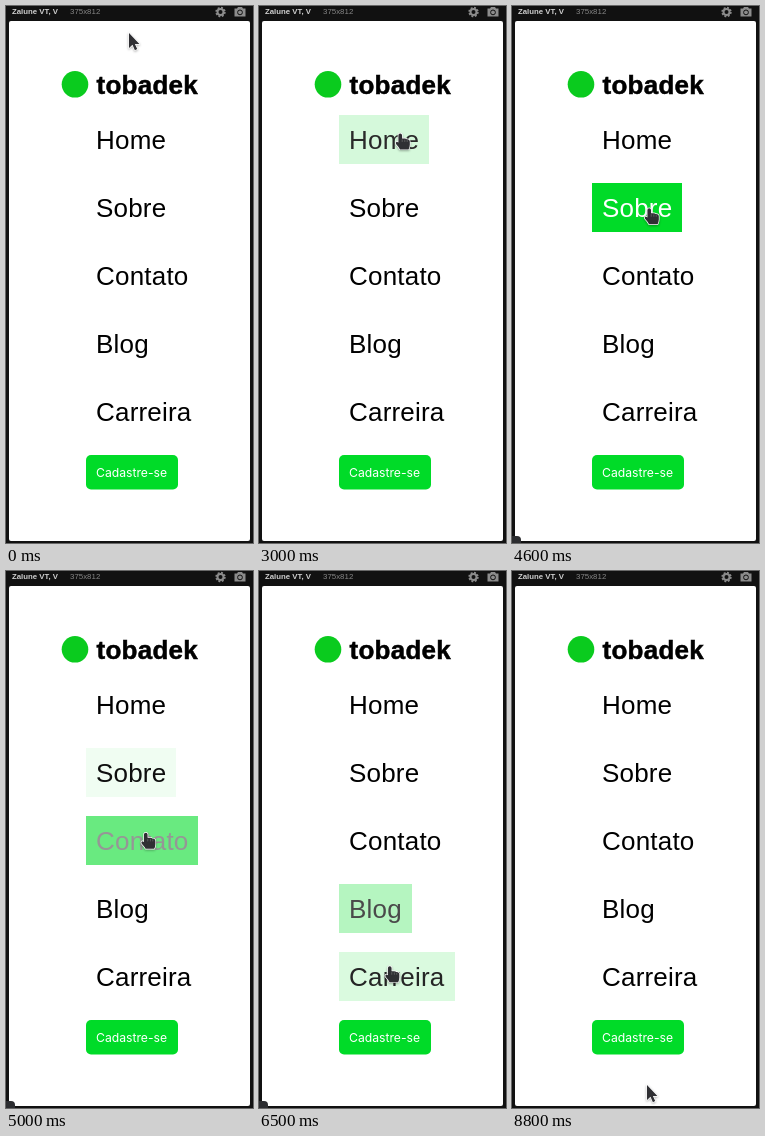
An HTML page for the animation above (9800 ms loop, 247 by 537 pixels).

```html
<!DOCTYPE html>
<html lang="pt">
<head>
<meta charset="utf-8">
<title>Menu</title>
<style>
  html, body { margin: 0; width: 100%; height: 100%; overflow: hidden; background: #111; }
  svg { display: block; width: 247px; height: 537px; }
  text { font-family: "Liberation Sans", Arial, sans-serif; white-space: pre; }
  .link { font-size: 26px; letter-spacing: .2px; }
  .brand { font-size: 26px; font-weight: bold; letter-spacing: .25px; stroke: #000; stroke-width: .5px; }
  .action { font: 12.2px Inter, sans-serif; fill: #fff; }
  .cursor { fill: #2f2f33; stroke: #fff; stroke-width: 1.4px; stroke-linejoin: round; paint-order: stroke;
            filter: drop-shadow(0 1px 1px rgba(0, 0, 0, .3)); }
</style>
</head>
<body>
<svg viewBox="0 0 247 537">
  <rect width="247" height="537" fill="#111"/>
  <text x="6" y="8" font-size="7.8" font-weight="bold" fill="#d0d0d0">Zalune VT, V</text>
  <text x="64" y="8" font-size="7.9" fill="#858585">375x812</text>
  <g fill="none" stroke="#8c8c8c">
    <circle cx="214.5" cy="6" r="3" stroke-width="2"/>
    <circle cx="214.5" cy="6" r="4.4" stroke-width="1.6" stroke-dasharray="1.9 1.556"/>
  </g>
  <path d="M228.5 2.5H231L232 1H236L237 2.5H239.5V10.5H228.5Z" fill="#8c8c8c"/>
  <circle cx="234" cy="6.4" r="2.4" fill="#8c8c8c" stroke="#111"/>
  <rect x="3" y="15" width="241" height="520" rx="2" fill="#fff"/>
  <circle cx="69" cy="78.3" r="13.3" fill="#0acb1e"/>
  <text class="brand" x="90.5" y="88">tobadek</text>
  <g id="menu"></g>
  <rect x="80" y="449" width="92" height="34.5" rx="5" fill="#00db28"/>
  <text class="action" x="90" y="471">Cadastre-se</text>
  <path id="status" d="M0 530H5Q9 530 9 534V537H0Z" fill="#2c2d30"/>
  <g id="pointer">
    <path id="arrow" class="cursor" d="M0 0V15L3.5 11.8L5.9 17.2L8.2 16.1L5.9 11H10.4Z"/>
    <g id="hand">
      <path class="cursor" d="M-1.8 1.8A1.8 1.8 0 0 1 1.8 1.8V5H4.4Q6 5 6.4 5.8Q9.6 5.6 9.6 8.4V11.4Q9.6 13.6 8.4 16H-.2Q-1 14 -4.2 10.6Q-5 8.8 -3.4 8.4L-1.8 9.2Z"/>
      <path d="M2 6V8.6M4.6 6.2V8.6M7 6.6V8.6" fill="none" stroke="#777" stroke-width=".6"/>
    </g>
  </g>
</svg>
<script>
const LOOP = 9800, STEP = 100, FADE = 300, ROW = 68;
const $ = id => document.getElementById(id);

// hover interval of each link
const links = [
  { label: 'Home', enter: 2958, leave: 3711 },
  { label: 'Sobre', enter: 3893, leave: 4790 },
  { label: 'Contato', enter: 4898, leave: 5600 },
  { label: 'Blog', enter: 5700, leave: 6374 },
  { label: 'Carreira', enter: 6461, leave: 7085 }
];

// each move eases the pointer to a new resting place
const home = [123, 27];
const moves = [
  { from: 600, to: 1300, at: [14, 61] },
  { from: 1300, to: 1600, at: [21, 68] },
  { from: 1600, to: 2400, at: [143, 79] },
  { from: 2600, to: 3100, at: [141, 133] },
  { from: 3500, to: 4100, at: [137, 197] },
  { from: 4500, to: 5100, at: [140, 267] },
  { from: 5300, to: 6000, at: [135, 334] },
  { from: 6100, to: 6630, at: [130, 406] },
  { from: 6800, to: 7400, at: [135, 464] },
  { from: 7900, to: 8000, at: [136, 464] },
  { from: 8100, to: 8800, at: [135, 514] }
];

function add(tag, attrs) {
  const el = document.createElementNS('http://www.w3.org/2000/svg', tag);
  for (const k in attrs) el.setAttribute(k, attrs[k]);
  return $('menu').appendChild(el);
}

links.forEach((link, i) => {
  link.box = add('rect', { x: 80, y: 109 + ROW * i, height: 49, fill: '#00db28' });
  link.text = add('text', { class: 'link', x: 90, y: 143 + ROW * i });
  link.text.textContent = link.label;
  link.box.setAttribute('width', Math.round(link.text.getComputedTextLength() + 20));
});

const clamp = v => Math.min(1, Math.max(0, v));
const smooth = k => k * k * (3 - 2 * k);

// CSS "ease": cubic-bezier(.25, .1, .25, 1)
function ease(x) {
  if (x <= 0 || x >= 1) return clamp(x);
  let lo = 0, hi = 1, u;
  for (let i = 0; i < 20; i++) {
    u = (lo + hi) / 2;
    if (.75 * u * (1 - u) + u ** 3 < x) lo = u; else hi = u;
  }
  return .3 * u * (1 - u) ** 2 + 3 * u * u * (1 - u) + u ** 3;
}

function position(t) {
  return moves.reduce(([x, y], { from, to, at }) => {
    const k = smooth(clamp((t - from) / (to - from)));
    return [x + (at[0] - x) * k, y + (at[1] - y) * k];
  }, home);
}

function draw(t) {
  for (const { box, text, enter, leave } of links) {
    const k = ease((t - enter) / FADE) - ease((t - leave) / FADE);
    const grey = Math.round(255 * k);
    box.setAttribute('opacity', k);
    text.setAttribute('fill', `rgb(${grey},${grey},${grey})`);
  }
  const [x, y] = position(t);
  const onButton = y > 449 && y < 483;
  const over = onButton || links.some(({ enter, leave }) => t >= enter && t < leave);
  $('pointer').setAttribute('transform', `translate(${x} ${y})`);
  $('hand').style.display = over ? '' : 'none';
  $('arrow').style.display = over ? 'none' : '';
  $('status').setAttribute('opacity', clamp((t - 3100) / FADE) * clamp((8800 - t) / FADE));
}

const start = performance.now();
function tick() {
  const t = (performance.now() - start) % LOOP;
  draw(Math.floor(t / STEP) * STEP);
  requestAnimationFrame(tick);
}
tick();
</script>
</body>
</html>
```
